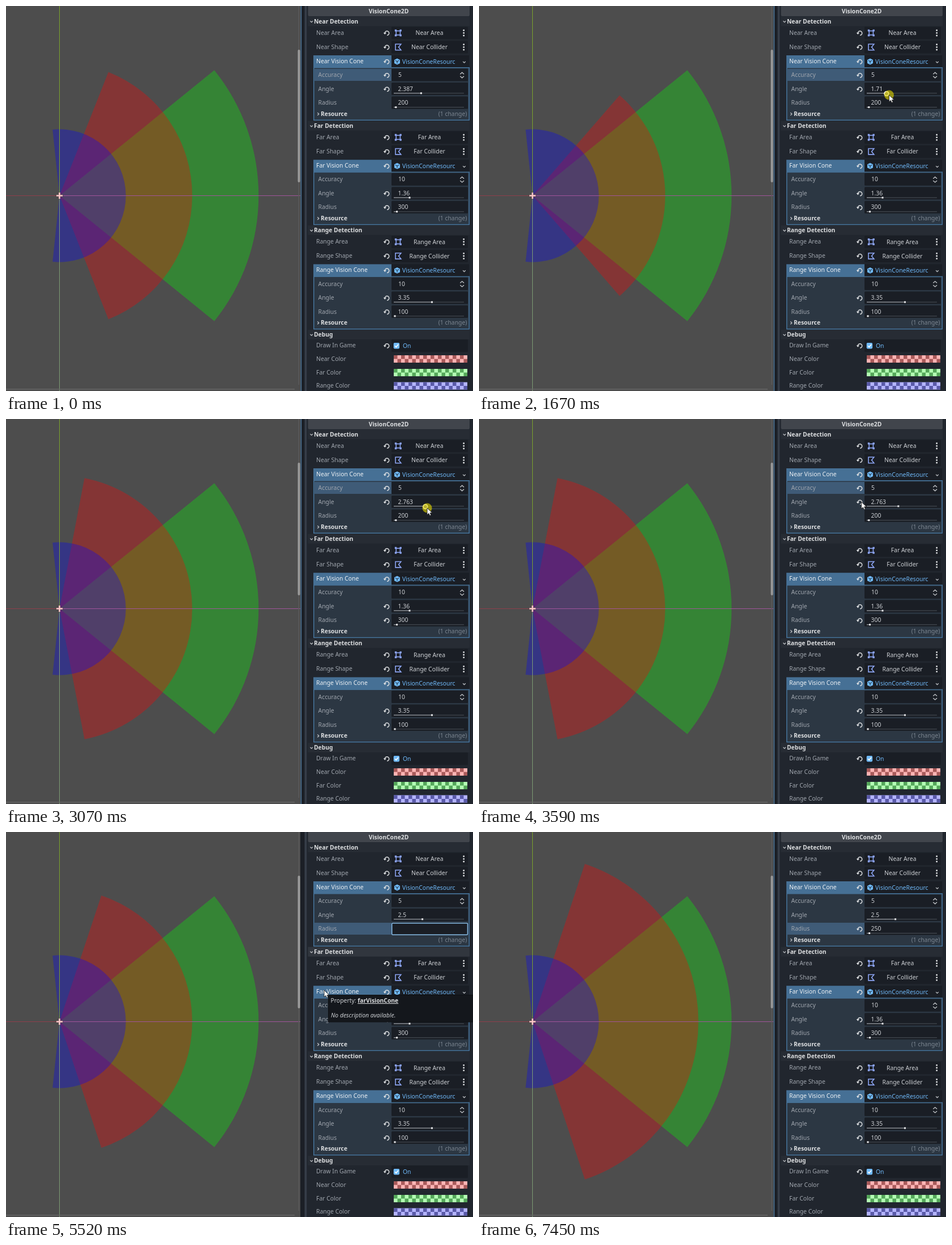
An HTML page that plays this animation: 825 px wide and 679 px high, repeating every 8000 ms.

```html
<!DOCTYPE html>
<html lang="en">
<head>
<meta charset="utf-8">
<title>Vision cone inspector</title>
<style>
  html, body { margin: 0; width: 100%; height: 100%; overflow: hidden; background: #21262e; }
  svg { display: block; width: 825px; height: 679px; }
  text { font: 10.4px "Noto Sans", "Open Sans", sans-serif; fill: #cdd0d4; white-space: pre; }
  .label { fill: #a0a6ae; }
  .bold { font-weight: 700; font-size: 10.3px; fill: #dcdee0; }
  .head { fill: #eef1f4; }
  .link { fill: #70bafa; }
  .dim { fill: #7c8691; }
  .mid { text-anchor: middle; }
  .end { text-anchor: end; }
  .field { fill: #1a1e25; }
  .line { fill: none; stroke: #c4c7cb; stroke-width: 1.3; }
  .node { fill: none; stroke: #8da5f3; stroke-width: 1.6; }
</style>
</head>
<body>
<svg id="stage" viewBox="0 0 825 679" xmlns="http://www.w3.org/2000/svg"></svg>
<script>
const LOOP = 8000;
const ORIGIN = { x: 94.5, y: 334.5 };
const UNIT = 1.1725;

const rect = (x, y, w, h, attrs = '') => `<rect x="${x}" y="${y}" width="${w}" height="${h}" ${attrs}/>`;
const text = (x, y, str, cls = '', attrs = '') => `<text x="${x}" y="${y + 3.7}" class="${cls}" ${attrs}>${str}</text>`;
const path = (d, attrs) => `<path d="${d}" ${attrs}/>`;
const at = (x, y, inner, attrs = '') => `<g transform="translate(${x} ${y})" ${attrs}>${inner}</g>`;

function sector(radius, angle) {
  const r = radius * UNIT, x = ORIGIN.x + r * Math.cos(angle / 2), dy = r * Math.sin(angle / 2);
  return `M${ORIGIN.x} ${ORIGIN.y}L${x} ${ORIGIN.y - dy}A${r} ${r} 0 ${angle > Math.PI ? 1 : 0} 1 ${x} ${ORIGIN.y + dy}Z`;
}
const angleX = a => 686 + 19.85 * a;
const radiusX = r => 685.3 + 0.0175 * r;

// Icons
const revert = (y, id = '') => at(672.7, y,
  path('M-3.4 .4A3.7 3.7 0 1 1 .4 4.1', 'class="line" style="stroke:#dfe1e3;stroke-width:1.5"') +
  path('M-6-.6h5.2l-2.6 3.4z', 'fill="#dfe1e3"'), id && `id="${id}"`);
const areaIcon = y => at(692.8, y,
  rect(-3.6, -3.6, 7.2, 7.2, 'class="node"') +
  [[-6, -6], [2.6, -6], [-6, 2.6], [2.6, 2.6]].map(([x, v]) => rect(x, v, 3.4, 3.4, 'fill="#8da5f3"')).join(''));
const polyIcon = y => at(692.8, y, path('M5-5.2H-4.8V5.2H5L.8 0Z', 'class="node"'));
const cubeIcon = y => at(691, y,
  path('M0-5.4L5-3V3L0 5.4L-5 3V-3Z', 'fill="#70bafa"') +
  path('M-3.4-1.9L0-.2L3.4-1.9M0-.2V3.4', 'fill="none" stroke="#1a1e25" stroke-width="1"'));
const dots = y => [-4.6, 0, 4.6].map(d => rect(807.4, y + d - 1.3, 2.6, 2.6, 'rx=".6" fill="#e0e2e4"')).join('');
const chevron = (x, y) => at(x, y, path('M-2.3-1.1L0 1.2L2.3-1.1', 'class="line"'));
const spinner = y => at(805.7, y, path('M-3.4-1.8L0-4.8L3.4-1.8M-3.4 1.8L0 4.8L3.4 1.8', 'class="line"'));

function slider(x, y, id = '') {
  const name = part => id ? `id="${id}${part}"` : '';
  return `<g ${name('Slider')}>` + rect(685, y - .5, 124, 1, 'fill="#4b5058"') +
    rect(685, y - .5, x - 685, 1, `fill="#a9adb2" ${name('Fill')}`) +
    rect(x - 1.5, y - 1.5, 3, 3, `fill="#e6e7e9" ${name('Grab')}`) + '</g>';
}

const field = (y, h = 22) => rect(681, y - h / 2, 135, h, 'class="field" rx="1.5"');
const section = (y, name, id) => rect(533.5, y - 8.5, 285.5, 17, `fill="#272c34" ${id ? `id="${id}"` : ''}`) +
  chevron(539.7, y + .5) + text(544, y, name, 'bold');

function row(y, name, cls = 'label', x = 548) { return text(x, y, name, cls); }

function group(y, name, cone) {
  const near = name === 'Near';
  const id = near ? 'near' : '';
  const [acc, ang, rad] = [y + 94.5, y + 119, y + 143.5];
  return section(y, name + ' Detection', name === 'Far' ? 'farHead' : '') +
    row(y + 20, name + ' Area') + revert(y + 20.5) + field(y + 20.5) + areaIcon(y + 20.5) + text(748, y + 20.5, name + ' Area', 'mid') + dots(y + 20.5) +
    row(y + 45, name + ' Shape') + revert(y + 45.5) + field(y + 45.5) + polyIcon(y + 45.5) + text(748, y + 45.5, name + ' Collider', 'mid') + dots(y + 45.5) +
    rect(543.7, y + 81.7, 274.6, 92.6, 'fill="#2c3743" stroke="#4878a2" stroke-width="1.4"') +
    rect(681, y + 60, 137, 21, 'class="field"') +
    rect(543, y + 60, 138, 22, 'fill="#467095"') +
    row(y + 70, name + ' Vision Cone', 'head') + revert(y + 71) + cubeIcon(y + 71) +
    text(700, y + 71, 'VisionConeResourc', 'link') + chevron(809.5, y + 72) +
    (near ? rect(545, acc - 10.5, 136, 21, 'fill="#3f5b77" id="picked"') : '') +
    [acc, ang, rad].map(v => field(v)).join('') +
    row(acc, 'Accuracy', 'label', 551.5) + text(693, acc, cone.acc) + spinner(acc + .5) + (near ? revert(acc + .5) : '') +
    row(ang, 'Angle', 'label', 551.5) + text(692.5, ang, cone.angle, '', near ? 'id="angleText"' : '') +
    revert(ang + .5, near ? 'angleRevert' : '') + slider(angleX(cone.angle), ang + 7.8, near ? 'angle' : '') +
    row(rad, 'Radius', 'label', 551.5) +
    (near ? rect(692, rad - 6.5, 19, 14, 'fill="#56718c" id="selection"') : '') +
    text(692.5, rad, cone.radius, '', near ? 'id="radiusText"' : '') +
    revert(rad + .5, near ? 'radiusRevert' : '') + slider(radiusX(cone.radius), rad + 8, near ? 'radius' : '') +
    (near ? rect(681.7, rad - 9.7, 133.8, 20.4, 'fill="none" stroke="#88bde8" stroke-width="1.5" rx="1.5" id="focus"') +
      rect(693, rad - 6.5, 1, 14, 'fill="#dfe3e7" id="caret"') : '') +
    at(551.5, y + 163.5, path('M-1.2-2.4L1.2 0L-1.2 2.4', 'class="line"')) + text(556, y + 163, 'Resource', 'bold') +
    text(814.5, y + 163, '(1 change)', 'dim end');
}

function swatch(y, name, light, dark) {
  let out = row(y, name) + rect(685, y - 6, 130, 13, `fill="${light}"`), d = '';
  for (let i = 0; i < 20; i++) d += `M${685 + i * 6.5} ${y - 6 + (i % 2) * 6.5}h6.5v6.5h-6.5z`;
  return out + path(d, `fill="${dark}"`);
}

const cone = (id, color, d) => path(d, `id="${id}" fill="${color}" fill-opacity=".31"`);
const { x: ox, y: oy } = ORIGIN;

document.getElementById('stage').innerHTML =
  rect(0, 0, 521, 679, 'fill="#4d4d4d"') +
  cone('farCone', '#0f0', sector(300, 1.36)) +
  cone('nearCone', '#f00', sector(200, 2.387)) +
  cone('rangeCone', '#00f', sector(100, 3.35)) +
  rect(0, oy - .5, ox, 1, 'fill="#8d3f4b"') + rect(ox, oy - .5, 426, 1, 'fill="#a0549a"') +
  rect(ox - .5, 0, 1, oy, 'fill="#7ba32c"') + rect(ox - .5, oy, 1, 345, 'fill="#7d9c74"') +
  at(ox, oy, path('M-6 0H6M0-6V6', 'stroke="#5d3a3f" stroke-width="4" stroke-opacity=".5"') +
    path('M-5.5 0H5.5M0-5.5V5.5', 'stroke="#fac8c8" stroke-width="2.6"')) +
  rect(516.5, 0, 1.5, 668, 'fill="#5b5b5b"') + rect(515.5, 77, 4, 234, 'rx="2" fill="#9a9a9a"') +
  rect(0, 675, 510, 1.5, 'fill="#666"') +
  rect(520, 0, 8, 679, 'fill="#1b1f26"') + rect(520.5, 0, 1.6, 679, 'fill="#527a9c" id="viewFocus"') +
  rect(527.5, 0, 4, 679, 'fill="#363d48"') +
  rect(531.5, 0, 293.5, 679, 'fill="#21262e"') +
  rect(533.5, -3, 285.5, 21, 'rx="2" fill="#41454c"') + text(676, 9, 'VisionCone2D', 'bold mid') +
  group(27, 'Near', { acc: 5, angle: 2.387, radius: 200 }) +
  group(211.2, 'Far', { acc: 10, angle: 1.36, radius: 300 }) +
  group(395.4, 'Range', { acc: 10, angle: 3.35, radius: 100 }) +
  section(579.5, 'Debug') +
  row(598.5, 'Draw In Game') + revert(599) + field(599) +
  rect(684.7, 594, 10.4, 10.4, 'rx="1.8" fill="#70bafa"') +
  path('M687 599.3L689.2 601.6L693 596.8', 'fill="none" stroke="#fff" stroke-width="1.6"') + text(701, 599, 'On', 'link') +
  swatch(622, 'Near Color', '#ffb4b4', '#a85a5a') +
  swatch(646, 'Far Color', '#b4ffb4', '#55a65a') +
  swatch(669.5, 'Range Color', '#b4b4ff', '#5a5aa8') +
  '<g id="tip">' + rect(569.5, 287.5, 258, 47.5, 'fill="#14171c" stroke="#0e1114"') +
  `<text x="573.5" y="301">Property: <tspan class="bold" text-decoration="underline">farVisionCone</tspan></text>` +
  text(574, 323.5, 'No description available.', '', 'font-style="italic" style="font-style:italic"') + '</g>' +
  '<circle id="ring" r="3.8" cy="154.6" fill="#777" stroke="#fff" stroke-width="1.8"/>' +
  '<g id="cursor"><circle id="press" r="8.5" fill="#e0d400" fill-opacity=".62"/>' +
  path('M0 0V12L2.9 9.4L4.7 13.4L6.9 12.4L5.1 8.6H9Z', 'fill="#fff" stroke="#222" stroke-width=".9"') + '</g>';

const el = id => document.getElementById(id);
const show = (id, on) => el(id).setAttribute('visibility', on ? 'visible' : 'hidden');
const set = (id, name, value) => el(id).setAttribute(name, value);
const within = (t, from, to) => t >= from && t < to;

function track(keys, t) {
  if (t <= keys[0][0]) return keys[0].slice(1);
  for (let i = 1; i < keys.length; i++) {
    const [a, b] = [keys[i - 1], keys[i]];
    if (t < b[0]) {
      const p = (t - a[0]) / (b[0] - a[0]);
      return a.slice(1).map((v, n) => v + (b[n + 1] - v) * p);
    }
  }
  return keys[keys.length - 1].slice(1);
}

// Mouse steps away from where the drag begins
const DRAG = [[1230, 0], [1430, -2], [1560, -5], [1670, -9], [1790, -11], [2210, -11], [2400, -1], [2600, 6], [3060, 6], [3070, 5]];
const POINTER = [[80, 799, 646], [300, 760, 430], [480, 700, 230], [600, 690, 150], [660, 712, 130], [730, 738, 156],
  [970, 738, 156], [1010, 737, 157], [3100, 744, 157], [3300, 712, 151], [3550, 676, 146], [3710, 674, 147],
  [3870, 674, 147], [4110, 696, 167], [4350, 696, 167], [4360, 538, 262], [4400, 562, 279], [7409, 562, 279], [7410, 475, 300]];

function draw(t) {
  const step = Math.round(track(DRAG, t)[0]);
  const angle = t < 3700 ? 2.387 + 0.0752 * step : 2.5;
  const radius = t < 6740 ? 200 : 250;
  set('nearCone', 'd', sector(radius, angle));
  el('angleText').textContent = +angle.toFixed(3);
  set('angleFill', 'width', angleX(angle) - 685);
  set('angleGrab', 'x', angleX(angle) - 1.5);
  set('radiusGrab', 'x', radiusX(radius) - 1.5);
  show('angleRevert', t < 3700);
  show('radiusRevert', t >= 6740);

  const editing = within(t, 4130, 6740);
  show('radiusSlider', !editing);
  show('focus', within(t, 4130, 7410));
  show('selection', within(t, 4130, 5150));
  show('viewFocus', !within(t, 4130, 7410));
  const typed = t < 5150 ? '200' : t < 5770 ? '' : t < 6070 ? '2' : t < 6150 ? '25' : t < 6740 || t >= 6740 ? '250' : '';
  el('radiusText').textContent = typed;
  show('caret', within(t, 4150, 4570) || within(t, 5150, 5520) || within(t, 5640, 5770));
  set('picked', 'y', t < 4130 ? 111 : 160);
  set('farHead', 'fill', within(t, 4360, 7410) ? '#31363e' : '#272c34');
  show('tip', within(t, 5060, 7410));

  const dragging = within(t, 1220, 3100);
  const [px, py] = track(POINTER, t);
  const x = dragging ? 737 + 1.4 * step : px;
  set('cursor', 'transform', `translate(${x} ${py})`);
  show('cursor', within(t, 80, 7450));
  const pressed = dragging || within(t, 3620, 3710) || within(t, 4080, 4150) || within(t, 7410, 7450);
  set('press', 'display', pressed ? 'inline' : 'none');
  set('ring', 'cx', angleX(angle));
  show('ring', dragging || (within(t, 700, 3400) && x > 681 && py > 135 && py < 158));
}

function tick(now) {
  draw(now % LOOP);
  requestAnimationFrame(tick);
}
draw(0);
requestAnimationFrame(tick);
</script>
</body>
</html>
```
